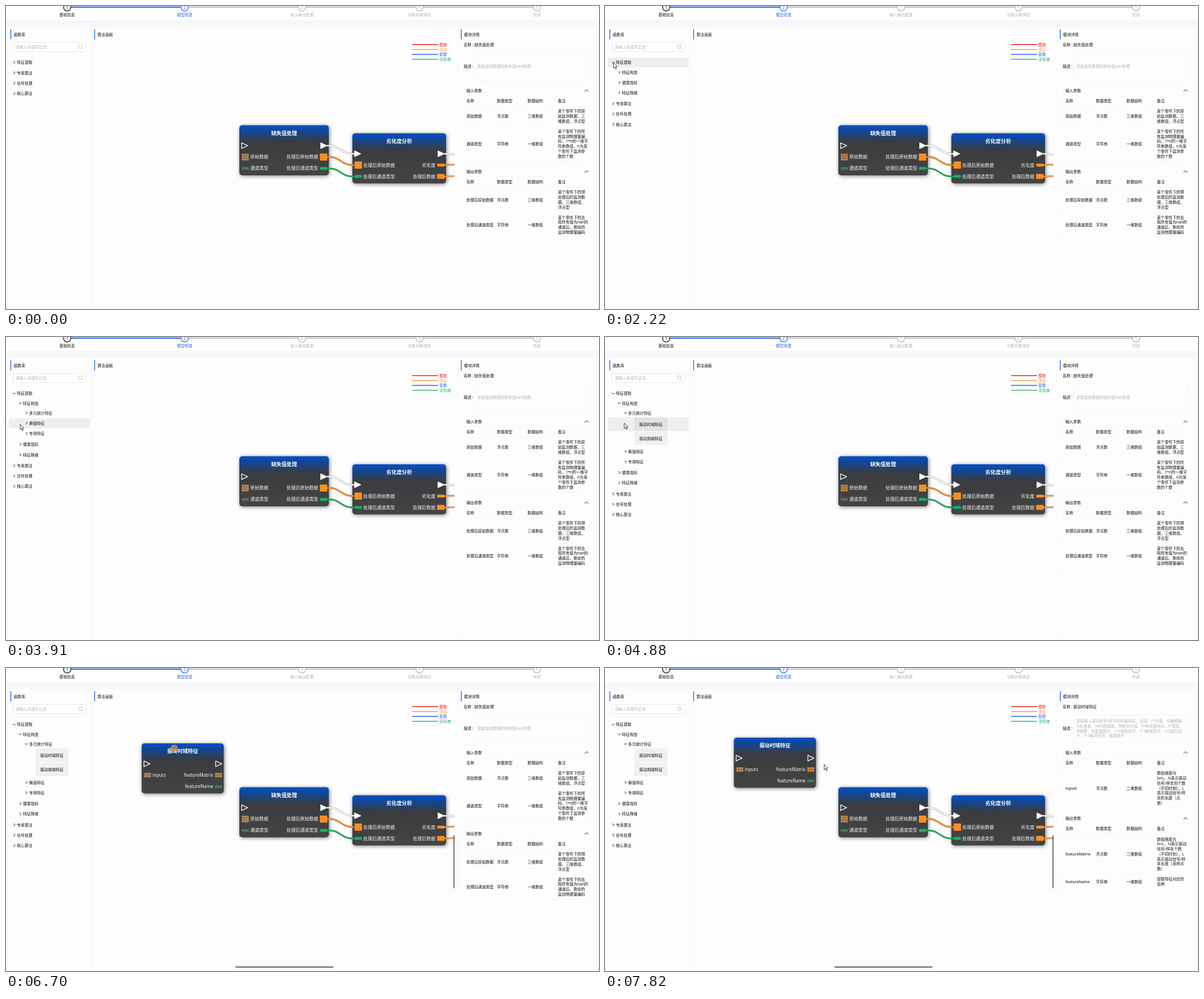
An HTML page with a canvas for the animation above (8000 ms loop, 1047 px wide and 535 px high).

```html
<!DOCTYPE html>
<html lang="zh-CN">
<head>
<meta charset="utf-8">
<style>
html, body { margin: 0; width: 100%; height: 100%; overflow: hidden; background: #f6f7f9; }
canvas { display: block; }
</style>
</head>
<body>
<canvas id="stage" width="1047" height="535"></canvas>
<script>
const g = document.getElementById('stage').getContext('2d');
const FONT = '"Noto Sans", "Noto Sans CJK SC", "Noto Sans CJK", sans-serif';
const LOOP = 8000;
const BLUE = '#2a66e4', ORANGE = '#f98a1c', GREEN = '#12ab5c', INK = '#0c0c0d', PALE = '#b0b2b6';
const OPEN_TIMES = [1360, 3350, 4450];
const DROP = 5860, SELECT = 7050;
const PRESSES = [[1360, 2220], [3350, 3700], [4450, 4700], [5350, DROP], [6600, SELECT]];

// time, x, y of the pointer tip
const PATH = [
  [130, 903, 103], [550, 420, 112], [900, 20, 102], [1160, 15, 100], [2950, 15, 100], [3030, 25, 117],
  [3700, 25, 117], [3910, 25, 154], [4120, 30, 150], [4300, 36, 134], [4700, 36, 134], [4880, 34, 152],
  [4950, 36, 153], [5250, 78, 156], [5400, 78, 156], [5790, 236, 146], [5860, 241, 143.5],
  [5930, 241, 143.5], [6400, 298, 153], [6630, 298, 153], [6700, 297, 142], [7000, 285, 132],
  [7150, 285, 132], [7400, 349, 177], [7820, 387, 170]
];

// label, depth, number of opened levels needed; depth 3 is a draggable leaf
const TREE = [
  ['特征提取', 0, 0], ['特征构造', 1, 1], ['多元统计特征', 2, 2], ['振动时域特征', 3, 3],
  ['振动频域特征', 3, 3], ['熵值特征', 2, 2], ['专用特征', 2, 2], ['健康指标', 1, 1],
  ['特征降维', 1, 1], ['专用算法', 0, 0], ['信号处理', 0, 0], ['核心算法', 0, 0]
];

const DETAILS = [
  {
    name: '缺失值处理',
    about: ['原始监测数据的缺失值nan处理'],
    tables: [
      [['原始数据', '浮点数', '三维数组', '某个零件下的原|始监测数据，三|维数组，浮点型'],
       ['通道类型', '字符串', '一维数组', '某个零件下的所|有监测物理量编|码，1*n的一维字|符串数组，n为某|个零件下监测参|数的个数']],
      [['处理后原始数据', '浮点数', '三维数组', '某个零件下的预|处理后的监测数|据，三维数组，|浮点型'],
       ['处理后通道类型', '字符串', '一维数组', '某个零件下的去|除所有值为nan的|通道后，剩余的|监测物理量编码']]
    ]
  },
  {
    name: '振动时域特征',
    about: ['提取输入振动信号/样本的时域特征，包括：f1均值、f2峰峰值、',
      'f3标准差、f4方根幅值、f5绝对均值、f6有效值RMS、f7歪度、',
      'f8峭度、f9歪度因子、f10峭度因子、f11峰度因子、f12波形因',
      '子、f13脉冲因子、裕度因子'],
    tables: [
      [['inputs', '浮点数', '二维数组', '数组维度为|N×L，N表示振动|信号/样本的个数|（不同时刻），L|表示振动信号/样|本的长度（点|数）']],
      [['featureMatrix', '浮点数', '二维数组', '数组维度为|N×L，N表示振动|信号/样本个数|（不同时刻），L|表示振动信号/样|本长度（采样点|数）'],
       ['featureName', '字符串', '一维数组', '提取特征对应的|名称']]
    ]
  }
];

const ramp = (t, a, b) => Math.min(1, Math.max(0, (t - a) / (b - a)));

function text(s, x, y, color = INK, size = 6.85, align = 'left', weight = 400) {
  g.font = `${weight} ${size}px ${FONT}`;
  g.textAlign = align;
  g.fillStyle = color;
  g.fillText(s, x, y + size * 0.38);
}

function rect(x, y, w, h, fill, r = 0, stroke) {
  g.beginPath();
  g.roundRect(x, y, w, h, r);
  if (fill) { g.fillStyle = fill; g.fill(); }
  if (stroke) { g.strokeStyle = stroke; g.lineWidth = 1; g.stroke(); }
}

function line(points, color, width = 1) {
  g.beginPath();
  points.forEach(p => g.lineTo(...p));
  g.strokeStyle = color;
  g.lineWidth = width;
  g.stroke();
}

function circle(x, y, r, fill, stroke, width = 1) {
  g.beginPath();
  g.arc(x, y, r, 0, 7);
  if (fill) { g.fillStyle = fill; g.fill(); }
  if (stroke) { g.strokeStyle = stroke; g.lineWidth = width; g.stroke(); }
}

function pointerAt(t) {
  const i = PATH.findIndex(p => p[0] > t);
  if (i < 0) return PATH[PATH.length - 1].slice(1);
  if (!i) return null;
  const [t0, x0, y0] = PATH[i - 1], [t1, x1, y1] = PATH[i], k = ramp(t, t0, t1);
  return [x0 + (x1 - x0) * k, y0 + (y1 - y0) * k];
}

function drawFrame() {
  rect(0, 0, 1047, 535, '#f6f7f9');
  rect(0, 0, 1047, 24.5, '#fff');
  [[3, 147.5], [152, 645.5], [799, 244.5]].forEach(([x, w]) => rect(x, 37, w, 497, '#fdfdfd', 2));

  ['基础信息', '模型搭建', '输入输出配置', '功能对象绑定', '完成'].forEach((label, i) => {
    const x = 108 + i * 207.35, color = [INK, BLUE][i] || PALE;
    if (i < 4) line([[x + 7, 2], [x + 200.5, 2]], i ? '#bfc1c5' : BLUE, 2);
    circle(x, 2.5, 6.3, '#fff', color, 1.3);
    text(i + 1, x, 2.5, color, 7, 'center');
    text(label, x, 15.5, color, 6.85, 'center');
  });

  [['函数库', 8], ['算法画板', 156], ['模块详情', 803.3]].forEach(([label, x]) => {
    rect(x - 0.2, 41, 1.4, 18, BLUE);
    text(label, x + 5.5, 50.3);
  });

  rect(12.5, 64.5, 128, 16, '#fff', 2, '#e8e9ec');
  text('请输入关键字过滤', 17, 72.5, PALE);
  circle(131.3, 71.8, 3.3, null, PALE, 0.8);
  line([[133.6, 74.2], [135.6, 76.2]], PALE, 0.8);

  [['整数', '#f51d1d'], ['浮点', ORANGE], ['复数', '#2a5cf0'], ['字符串', GREEN]].forEach(([label, color], i) => {
    const y = 68.3 + i * 8.6;
    line([[717, y], [763, y]], color, 1.4);
    text(label, 765, y + 0.2, color);
  });
}

function drawTree(t, pointer) {
  const opened = OPEN_TIMES.filter(a => t >= a).length;
  let y = 0, last = null;
  for (const [label, depth, need] of TREE) {
    if (need > opened) continue;
    const leaf = depth === 3, half = leaf ? 12 : 8.6;
    if (last === null) y = 99.7;
    else if (leaf) y += last === 3 ? 25 : 20;
    else if (last === 3) y += 23;
    else y += depth > last ? 17.2 : depth < last ? 19.2 : 18.2;
    last = depth;

    if (pointer && pointer[0] < 148 && Math.abs(pointer[1] - y) < half) rect(5, y - half, 143, half * 2, '#eeeeee');
    if (leaf) {
      rect(52, y - 12, 58.5, 24, 'rgba(0,0,0,.05)', 2);
      text(label, 81, y, INK, 6.85, 'center');
      continue;
    }
    const x = 14.5 + depth * 10.8;
    const isOpen = opened > depth && TREE.findIndex(r => r[0] === label) === depth;
    line(isOpen ? [[x - 2.2, y - 1], [x, y + 1.2], [x + 2.2, y - 1]]
      : [[x - 1, y - 2.3], [x + 1.3, y], [x - 1, y + 2.3]], INK, 1);
    text(label, x + 4.7, y);
  }
}

function link(x, y, color) {
  g.beginPath();
  g.moveTo(x, y);
  g.bezierCurveTo(x + 27, y, x + 21, y + 14.5, x + 48, y + 14.5);
  g.strokeStyle = 'rgba(90,90,90,.6)';
  g.lineWidth = 3.4;
  g.stroke();
  g.strokeStyle = color;
  g.lineWidth = 2.3;
  g.stroke();
}

function port(kind, x, y, on) {
  if (kind === 'flow') {
    g.beginPath();
    g.moveTo(x - 5, y - 5);
    g.lineTo(x + 5.7, y);
    g.lineTo(x - 5, y + 5);
    g.closePath();
    g.strokeStyle = '#f4f4f4';
    g.lineWidth = 1.3;
    g.lineJoin = 'round';
    g.stroke();
    if (on) { g.fillStyle = '#fff'; g.fill(); }
    g.lineJoin = 'miter';
    return;
  }
  // kinds: cube 3x3, grid 3x2, float and string 3x1
  const rows = { cube: 3, grid: 2 }[kind] || 1, pill = rows === 1;
  const color = kind === 'string' ? GREEN : ORANGE;
  const h = rows * 4 + (pill ? 1.4 : 0.6);
  rect(x - 6.6, y - h / 2, 13.2, h, on ? color : pill ? '#56635c' : '#736b62', pill ? 2.2 : 1);
  const s = on ? 1.4 : pill ? 2.1 : 2.7;
  const dot = on ? (kind === 'string' ? '#55c48c' : '#ffb35e') : pill ? '#2f9d63' : '#e08a35';
  for (let r = 0; r < rows; r++) for (let c = -1; c < 2; c++) {
    rect(x + c * 4.1 - s / 2, y + (r - (rows - 1) / 2) * 4 - s / 2, s, s, dot, 0.4);
  }
}

// ports: [kind, side, row, label, connected]
function node(title, x, y, w, ports) {
  g.save();
  g.shadowColor = 'rgba(0,0,0,.5)';
  g.shadowBlur = 7;
  g.shadowOffsetX = g.shadowOffsetY = 1.2;
  const fill = g.createLinearGradient(0, y, 0, y + 88.5);
  fill.addColorStop(0, '#0850c4');
  fill.addColorStop(0.1, '#0d489f');
  fill.addColorStop(0.33, '#3a3c3f');
  fill.addColorStop(1, '#444444');
  rect(x, y, w, 88.5, fill, 5);
  g.restore();
  text(title, x + w / 2, y + 13.8, '#fff', 9.1, 'center', 700);
  for (const [kind, side, row, label, on] of ports) {
    const py = y + 36.2 + row * 20;
    const px = side ? x + w - 9.3 : x + (kind === 'flow' ? 9 : 10.5);
    port(kind, px, py, on);
    if (label) text(label, side ? px - 9.5 : px + 8.7, py - 0.4, '#f5f5f5', 8, side ? 'right' : 'left');
  }
}

function drawBoard(t, pointer) {
  g.save();
  g.beginPath();
  g.rect(153, 60, 639, 474);
  g.clip();
  node('缺失值处理', 412, 210.5, 158, [
    ['flow', 0, 0], ['flow', 1, 0, '', 1], ['cube', 0, 1, '原始数据'], ['cube', 1, 1, '处理后原始数据', 1],
    ['string', 0, 2, '通道类型'], ['string', 1, 2, '处理后通道类型', 1]]);
  node('劣化度分析', 611.5, 224.7, 165.5, [
    ['flow', 0, 0, '', 1], ['flow', 1, 0, '', 1], ['cube', 0, 1, '处理后原始数据', 1], ['float', 1, 1, '劣化度', 1],
    ['string', 0, 2, '处理后通道类型', 1], ['grid', 1, 2, '处理后数据', 1]]);
  [['#fafafa', 246.5], [ORANGE, 266.3], [GREEN, 286.6]].forEach(([color, y], i) => {
    link(567, y, color);
    const ends = [[774, y + 14.5], [792, y + (i ? 13.8 : 15.2)]];
    line(ends, 'rgba(90,90,90,.6)', 3.4);
    line(ends, i ? '#f0a055' : color, 2.3);
  });

  if (t >= DROP) {
    let x = 240.5, y = 144;
    if (t >= 6630) [x, y] = t < SELECT ? [pointer[0] - 57.5, pointer[1] - 9] : [227.5, 123];
    node('振动时域特征', x, y, 145, [
      ['flow', 0, 0], ['flow', 1, 0], ['grid', 0, 1, 'inputs'],
      ['grid', 1, 1, 'featureMatrix'], ['string', 1, 2, 'featureName']]);
  }

  g.globalAlpha = t < 3000 ? ramp(t, 200, 400) * (1 - ramp(t, 900, 1160)) : ramp(t, DROP, 6020);
  rect(790.3, 295, 1.3, 94, '#2c2c2c', 0.6);
  rect(405, 527.3, 173, 1.4, '#2c2c2c', 0.6);
  g.restore();
}

function drawDetails({ name, about, tables }) {
  const rule = y => line([[808, y], [1033, y]], '#f5f6f7');
  const columns = [813, 866.8, 920.8, 974.5];
  text('名称 : ' + name, 808, 68.5);
  text('描述 :', 808, 106.5);
  rect(827.5, 82.5, 203, 49, '#fdfdfd', 2, '#f3f4f5');
  about.forEach((s, i) => text(s, 832, 106.7 + (i - (about.length - 1) / 2) * 8.7, PALE));
  let y = 149.3;
  tables.forEach((rows, i) => {
    text(i ? '输出参数' : '输入参数', 813, y);
    line([[1021.5, y + 1.8], [1025, y - 1.8], [1028.5, y + 1.8]], INK, 0.9);
    rule(y + 9);
    ['名称', '数据类型', '数据结构', '备注'].forEach((s, c) => text(s, columns[c], y + 18.1));
    y += 27.5;
    rule(y);
    for (const row of rows) {
      const notes = row[3].split('|'), h = notes.length * 8.75 + 9.2, mid = y + h / 2;
      row.slice(0, 3).forEach((s, c) => text(s, columns[c], mid));
      notes.forEach((s, n) => text(s, columns[3], mid + (n - (notes.length - 1) / 2) * 8.75));
      y += h;
      rule(y);
    }
    y += 18.4;
  });
}

function drawPointer(t, [x, y]) {
  g.beginPath();
  [[0, 0], [0, 9.5], [2.2, 7.6], [3.8, 11], [5.3, 10.3], [3.8, 7], [6.7, 6.8]].forEach(([a, b]) => g.lineTo(x + a, y + b));
  g.closePath();
  g.fillStyle = '#fff';
  g.fill();
  g.strokeStyle = '#111';
  g.lineWidth = 0.8;
  g.stroke();
  if (PRESSES.some(([a, b]) => t >= a && t < b)) circle(x, y, 6.8, 'rgba(205,150,90,.72)');
}

function draw(now) {
  const t = now % LOOP, pointer = pointerAt(t);
  drawFrame();
  drawTree(t, pointer);
  drawBoard(t, pointer);
  drawDetails(DETAILS[t < SELECT ? 0 : 1]);
  if (pointer) drawPointer(t, pointer);
}

let start;
function tick(now) {
  start ??= now;
  draw(now - start);
  requestAnimationFrame(tick);
}
draw(0);
requestAnimationFrame(tick);
</script>
</body>
</html>
```
